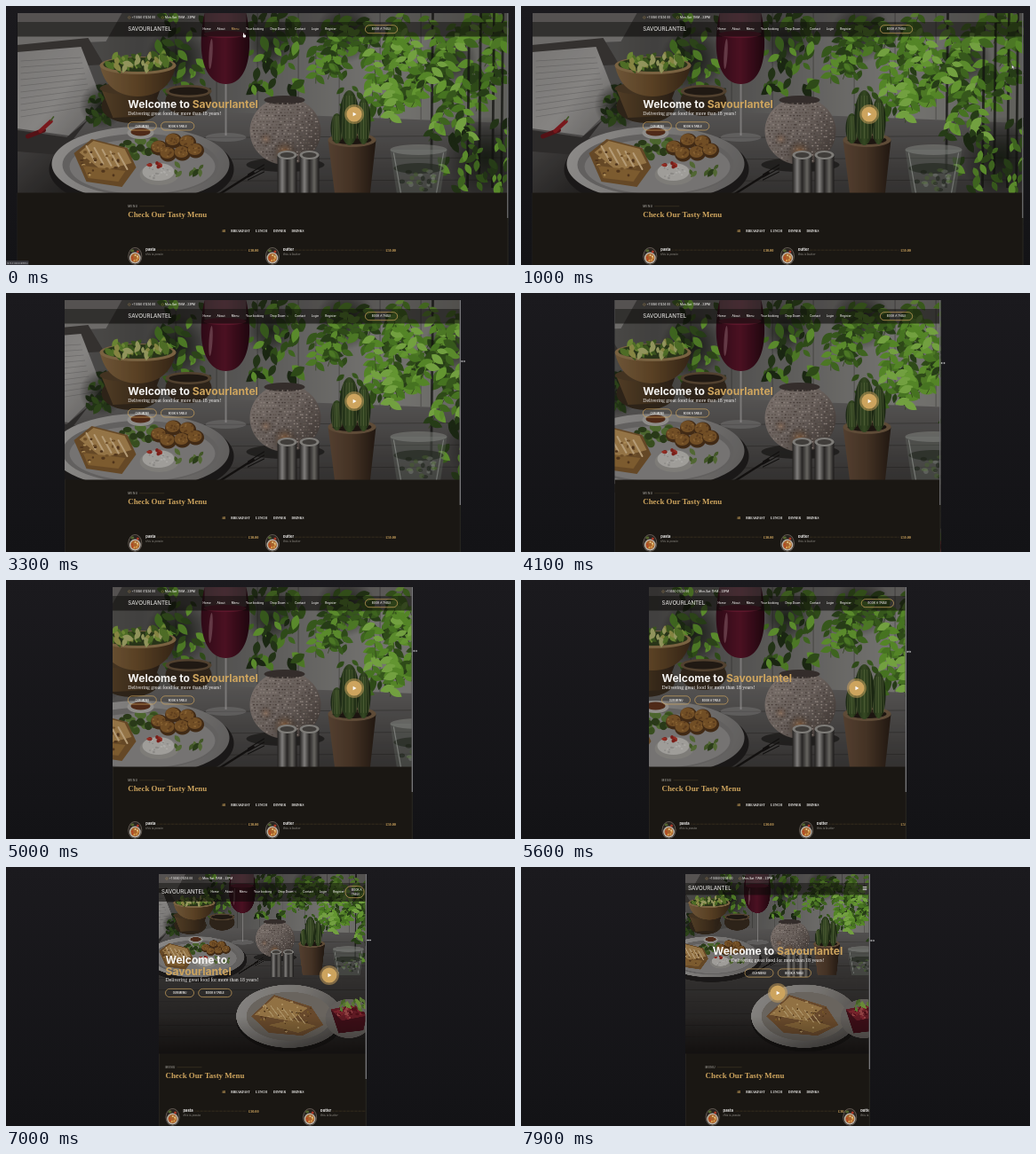
An HTML page with a canvas for the animation above (8000 ms loop, 573 px wide and 292 px high).

```html
<!DOCTYPE html>
<html lang="en">
<head>
<meta charset="utf-8">
<title>Responsive restaurant page</title>
<style>
html, body { margin: 0; width: 100%; height: 100%; overflow: hidden; background: #18171b; }
canvas { display: block; width: 573px; height: 292px; }
</style>
</head>
<body>
<canvas id="stage"></canvas>
<script>
const W = 573, H = 292, LOOP = 8000, MID = 289, TOP = 8, FOLD = 210.5;
const GOLD = '#cda45e', WHITE = '#f4f3f1';
const SANS = 'Inter, "Open Sans", sans-serif';
const SERIF = '"Liberation Serif", "Noto Serif", serif';
const BRAND = 'Savourlantel';
const PHOTO_W = 553, PHOTO_H = 369;

const dpr = Math.max(1, window.devicePixelRatio || 1);
const stage = document.getElementById('stage');
stage.width = W * dpr;
stage.height = H * dpr;
const ctx = stage.getContext('2d');

function randomizer(seed) {
  return () => {
    seed = (seed * 1664525 + 1013904223) >>> 0;
    return seed / 4294967296;
  };
}

// Linear interpolation through [time, value] stops
function track(stops, t) {
  if (t <= stops[0][0]) return stops[0][1];
  for (let i = 1; i < stops.length; i++) {
    const [t0, a] = stops[i - 1], [t1, b] = stops[i];
    if (t <= t1) return a + (b - a) * (t - t0) / (t1 - t0);
  }
  return stops[stops.length - 1][1];
}

/* ---------- photo backdrop, painted once ---------- */

function paintPhoto() {
  const cv = document.createElement('canvas');
  cv.width = PHOTO_W * 2;
  cv.height = PHOTO_H * 2;
  const g = cv.getContext('2d');
  g.scale(2, 2);
  g.translate(-12, -TOP);
  const rnd = randomizer(41);
  const between = (a, b) => a + (b - a) * rnd();
  const pick = list => list[Math.floor(rnd() * list.length)];

  const shade = (x0, y0, x1, y1, ...cols) => {
    const gr = g.createLinearGradient(x0, y0, x1, y1);
    cols.forEach((c, i) => gr.addColorStop(i / (cols.length - 1), c));
    return gr;
  };
  const ell = (x, y, rx, ry, col, rot = 0) => {
    g.fillStyle = col;
    g.beginPath();
    g.ellipse(x, y, rx, ry, rot, 0, 7);
    g.fill();
  };
  const glow = (x, y, r, col) => {
    const gr = g.createRadialGradient(x, y, 0, x, y, r);
    gr.addColorStop(0, col);
    gr.addColorStop(1, 'rgba(0,0,0,0)');
    ell(x, y, r, r, gr);
  };
  const rect = (x, y, w, h, col) => { g.fillStyle = col; g.fillRect(x, y, w, h); };
  const poly = (col, ...p) => {
    g.fillStyle = col;
    g.beginPath();
    for (let i = 0; i < p.length; i += 2) g.lineTo(p[i], p[i + 1]);
    g.closePath();
    g.fill();
  };
  const line = (col, w, x0, y0, x1, y1) => {
    g.strokeStyle = col;
    g.lineWidth = w;
    g.beginPath();
    g.moveTo(x0, y0);
    g.lineTo(x1, y1);
    g.stroke();
  };
  const leaf = (x, y, len, rot, col) => {
    g.save();
    g.translate(x, y);
    g.rotate(rot);
    g.fillStyle = col;
    g.beginPath();
    g.moveTo(-len, 0);
    g.quadraticCurveTo(-len * 0.2, -len, len, 0);
    g.quadraticCurveTo(-len * 0.2, len, -len, 0);
    g.fill();
    g.restore();
  };
  const leaves = (n, x0, x1, y0, y1, size, cols) => {
    for (let i = 0; i < n; i++) {
      leaf(between(x0, x1), between(y0, y1), between(size * 0.5, size), between(0.2, 2.6), pick(cols));
    }
  };
  // Sprigs: leaves in pairs along a drooping stem
  const sprigs = (n, x0, x1, y0, y1, size, cols) => {
    for (let i = 0; i < n; i++) {
      const x = between(x0, x1), y = between(y0, y1), lean = between(-0.6, 0.6);
      line('#34491f', 0.7, x, y, x + lean * 36, y + 36);
      for (let k = 0; k < 8; k++) {
        const side = k % 2 ? 1 : -1;
        leaf(x + lean * k * 4.5 + side * size * 0.55, y + k * 4.5, between(size * 0.6, size), side > 0 ? between(0.2, 1) : between(2.1, 2.9), pick(cols));
      }
    }
  };
  const crumbs = (n, x, y, rx, ry, r, cols) => {
    for (let i = 0; i < n; i++) {
      const a = between(0, 6.28), d = Math.sqrt(rnd());
      ell(x + Math.cos(a) * rx * d, y + Math.sin(a) * ry * d, between(r * 0.5, r), between(r * 0.4, r * 0.8), pick(cols));
    }
  };

  // wall and table
  rect(12, 8, 553, 369, shade(12, 0, 565, 0, '#62615f', '#4a4a48', '#686866', '#858582', '#6c6d68'));
  for (let x = 190; x < 480; x += 46) rect(x, 8, 1.2, 120, 'rgba(35,35,32,.35)');
  poly(shade(0, 120, 0, 377, '#605f5e', '#3b3a39', '#2c2b2a', '#1f1d1c'), 12, 135, 200, 118, 565, 132, 565, 377, 12, 377);
  for (let i = 0; i < 9; i++) line('rgba(18,17,16,.3)', 1, 12, 150 + i * 24, 565, 146 + i * 25);

  // notebook, papers and the dark corner on the left
  poly('#7c7b79', 12, 8, 130, 8, 112, 40, 12, 44);
  poly('#3a3836', 12, 44, 92, 36, 110, 66, 12, 72);
  poly(shade(12, 60, 110, 140, '#8a8987', '#989795', '#6e6d6b'), 12, 52, 84, 46, 108, 108, 70, 146, 12, 138);
  for (let i = 0; i < 10; i++) line('rgba(60,60,60,.3)', 0.7, 16, 62 + i * 7, 84 + i * 1.5, 58 + i * 6);
  poly('#333130', 12, 140, 68, 148, 92, 128, 60, 170, 12, 168);
  poly(shade(12, 150, 70, 215, '#4b4a49', '#242322'), 12, 164, 62, 168, 80, 215, 12, 215);

  // foliage
  const deep = ['#1d2c15', '#263a19', '#314d1d'];
  const greens = ['#34551c', '#467324', '#56892a', '#2a451a', '#669e32', '#3d6420'];
  const fresh = ['#5f992d', '#70ab38', '#82b849', '#4f8426'];
  for (const [x, y, r] of [[192, 60, 36], [108, 112, 26], [298, 42, 30], [382, 30, 34], [540, 170, 46], [500, 60, 30]]) {
    glow(x, y, r, 'rgba(18,26,14,.85)');
  }
  leaves(55, 170, 228, 8, 100, 9, deep.concat(greens));
  leaves(30, 92, 122, 92, 132, 8, deep);
  leaves(55, 272, 335, 8, 100, 10, deep.concat(greens));
  sprigs(9, 320, 420, 4, 62, 9, greens);
  leaves(50, 360, 440, 30, 128, 9, greens);
  sprigs(15, 415, 560, 0, 90, 10, greens);
  for (const x of [480, 521, 534, 549, 559]) line('rgba(18,19,17,.75)', 2.8, x, 8, x - 2, 205);
  sprigs(10, 410, 490, 10, 100, 9, fresh);
  sprigs(10, 485, 562, 10, 130, 10, fresh.concat(greens));
  leaves(55, 490, 565, 130, 208, 9, deep.concat(greens));

  // wooden bowls with salad
  ell(140, 113, 33, 19, '#33281b');
  poly(shade(105, 0, 175, 0, '#5d472c', '#463520', '#2a2017'), 106, 92, 174, 92, 162, 124, 120, 126);
  ell(139, 93, 34, 7, '#4c3b26');
  g.fillStyle = shade(105, 0, 190, 0, '#7d6240', '#654a29', '#3b2a19');
  g.beginPath();
  g.moveTo(105, 66);
  g.quadraticCurveTo(112, 101, 148, 102);
  g.quadraticCurveTo(184, 101, 191, 66);
  g.fill();
  ell(148, 67, 43, 10, '#8a704b');
  ell(148, 66, 39, 8, '#2d3c1c');
  leaves(48, 116, 181, 55, 72, 7, ['#587c2c', '#78983a', '#425f22', '#98984c', '#a5aa6a']);
  ell(205, 107, 26, 17, '#33281d');
  ell(205, 96, 26, 7, '#5d4b36');
  ell(205, 96, 22, 4.5, '#241d16');

  // wine glass
  line('#8b8a89', 2, 247, 86, 247, 146);
  ell(247, 148, 23, 5, 'rgba(165,165,165,.3)');
  g.fillStyle = shade(220, 0, 272, 0, '#350c1a', '#551327', '#260812');
  g.beginPath();
  g.moveTo(223, 8);
  g.bezierCurveTo(212, 60, 226, 88, 247, 88);
  g.bezierCurveTo(268, 88, 280, 60, 270, 8);
  g.fill();
  rect(223, 8, 47, 22, 'rgba(120,118,116,.45)');
  ell(246, 32, 24, 4, '#6b1a32');
  ell(230, 54, 2, 17, 'rgba(200,160,170,.35)', 0.06);

  // red chillies
  g.lineCap = 'round';
  line('#5f1519', 5, 24, 147, 42, 140);
  line('#8a1b20', 4.5, 38, 141, 50, 130);
  line('#49632d', 1.6, 50, 129, 53, 125);

  // plate with pastry, fritters and rice
  ell(152, 184, 104, 46, '#1d1c1b');
  ell(151, 178, 100, 42, shade(50, 130, 250, 220, '#a3a2a0', '#8a8987', '#696867'));
  ell(151, 179, 88, 35, '#6f6e6d');
  ell(153, 181, 82, 31, '#858483');
  crumbs(24, 150, 160, 26, 10, 6, ['#3f5a24', '#567535', '#2e421c']);
  poly('#73532c', 76, 166, 96, 150, 136, 160, 146, 182, 130, 204, 90, 198);
  poly('#a98550', 82, 165, 98, 152, 133, 161, 141, 177, 108, 186);
  for (let i = 0; i < 5; i++) line('#cdb287', 2, 90 + i * 9, 158 + i * 2, 100 + i * 9, 176 + i * 2);
  poly('#8d6836', 86, 180, 134, 186, 126, 198, 92, 194);
  crumbs(26, 110, 176, 28, 18, 2.2, ['#5b3d20', '#c29f64', '#7d5b2f']);
  for (const [x, y] of [[172, 160], [188, 152], [204, 154], [182, 167], [198, 166], [213, 163]]) {
    ell(x, y, 9.5, 8.5, '#4a3018');
    ell(x - 1, y - 1.5, 8, 6.5, '#80592b');
    crumbs(8, x - 1, y - 2, 7, 5, 1.5, ['#9b713a', '#684521']);
  }
  ell(172, 190, 22, 12, '#8f8e8a');
  ell(171, 187, 18, 10, '#b5b4b0');
  crumbs(20, 171, 187, 15, 8, 1.6, ['#c6c5c1', '#9d9c98']);
  crumbs(8, 168, 180, 8, 3, 3, ['#8a231d', '#a63428']);
  leaves(10, 190, 222, 178, 192, 6, ['#49632c', '#5c763a', '#2f451d']);
  ell(151, 143, 15, 7, '#a3a29e');
  ell(151, 142, 11, 4.5, '#59301c');

  // textured lantern
  ell(314, 179, 44, 8, 'rgba(12,11,10,.55)');
  ell(314, 141, 40, 38, shade(274, 110, 354, 175, '#8c827c', '#756c67', '#3d3632'));
  ell(313, 106, 23, 5, '#3a3431');
  g.save();
  g.beginPath();
  g.ellipse(314, 142, 39, 36, 0, 0, 7);
  g.clip();
  for (let y = 110; y < 180; y += 3.4) {
    for (let x = 276; x < 354; x += 3.4) ell(x + between(-1, 1), y, 1, 0.8, pick(['#544a45', '#9c918a', '#6b615b']));
  }
  glow(313, 164, 15, 'rgba(200,125,60,.5)');
  glow(292, 150, 10, 'rgba(190,130,85,.35)');
  g.restore();

  // cactus in a clay pot
  poly(shade(360, 0, 417, 0, '#604a38', '#4d3a2a', '#231a13'), 362, 151, 416, 151, 409, 215, 370, 215);
  ell(389, 151, 27, 8, '#6b563f');
  ell(389, 151, 22, 5, '#1f1812');
  for (const [x, y, rx, ry] of [[372, 138, 7, 17], [402, 130, 8, 26], [386, 126, 11, 31]]) {
    ell(x, y, rx, ry, shade(x - rx, 0, x + rx, 0, '#1d2c17', '#3c5328', '#182511'));
    for (let i = -2; i <= 2; i++) line('rgba(150,160,105,.4)', 0.7, x + i * rx * 0.3, y - ry * 0.8, x + i * rx * 0.38, y + ry * 0.75);
  }

  // shakers and water glass
  for (const x of [305, 330]) {
    rect(x, 168, 22, 52, shade(x, 0, x + 22, 0, '#242322', '#93928f', '#2c2b2a', '#75746f', '#1d1c1b'));
    ell(x + 11, 168, 11, 5, '#8f8e8a');
    ell(x + 11, 168, 8, 3, '#484643');
  }
  poly('rgba(105,112,105,.4)', 432, 162, 496, 162, 488, 216, 440, 216);
  ell(464, 162, 32, 6, 'rgba(165,170,163,.42)');
  ell(464, 183, 28, 6, 'rgba(40,48,38,.7)');
  crumbs(26, 464, 196, 21, 12, 4, ['rgba(160,168,158,.35)', 'rgba(30,36,26,.55)', 'rgba(80,110,50,.45)']);
  line('rgba(205,210,205,.45)', 1.2, 436, 166, 444, 211);
  line('rgba(205,210,205,.4)', 1.2, 492, 166, 484, 211);

  // cutlery and the front plates
  line('#131211', 2.5, 240, 212, 278, 188);
  for (let i = 0; i < 3; i++) line('#131211', 1.1, 272, 190 + i * 3, 290, 179 + i * 4);
  ell(345, 306, 111, 67, '#171615');
  ell(343, 300, 109, 65, shade(245, 240, 430, 365, '#989794', '#85837f', '#585653'));
  ell(343, 300, 88, 50, '#77736c');
  poly('#765432', 265, 300, 312, 256, 388, 280, 413, 318, 370, 340, 301, 334);
  poly('#a5824d', 272, 297, 313, 260, 381, 283, 344, 310);
  poly('#92703e', 300, 318, 353, 307, 398, 320, 361, 334);
  for (let i = 0; i < 6; i++) line('#c2a674', 2.2, 292 + i * 13, 276 + i * 3, 310 + i * 13, 300 + i * 3);
  crumbs(45, 335, 298, 58, 34, 2.6, ['#5e4223', '#c1a16a', '#87652f']);
  ell(465, 305, 48, 40, '#6e6b67');
  poly('#43101a', 428, 286, 476, 276, 502, 299, 495, 329, 444, 335);
  poly('#6c1e28', 428, 286, 476, 276, 502, 299, 451, 309);
  crumbs(45, 467, 293, 30, 12, 4, ['#8a2933', '#57121c', '#a34b4c']);
  leaves(20, 446, 505, 264, 286, 8, ['#50712d', '#64863b', '#78a03f']);
  rect(12, 300, 553, 77, shade(0, 300, 0, 377, 'rgba(10,9,8,0)', 'rgba(10,9,8,.45)'));
  return cv;
}

const photo = paintPhoto();

/* ---------- drawing helpers ---------- */

function box(x, y, w, h, fill) {
  ctx.fillStyle = fill;
  ctx.fillRect(x, y, w, h);
}

function disc(x, y, r, fill, ry = r) {
  ctx.fillStyle = fill;
  ctx.beginPath();
  ctx.ellipse(x, y, r, ry, 0, 0, 7);
  ctx.fill();
}

function text(str, x, y, font, fill = WHITE, align = 'left') {
  ctx.font = font;
  ctx.fillStyle = fill;
  ctx.textAlign = align;
  ctx.fillText(str, x, y);
}

function pill(x, y, w, h) {
  ctx.strokeStyle = GOLD;
  ctx.lineWidth = 0.7;
  ctx.beginPath();
  ctx.roundRect(x, y, w, h, Math.min(h / 2, 6));
  ctx.stroke();
}

function pillButton(label, x, y, w) {
  pill(x, y, w, 9.2);
  text(label, x + w / 2, y + 5.7, `600 2.9px ${SANS}`, WHITE, 'center');
}

/* ---------- page parts ---------- */

// Container width follows the page's breakpoints
function layout(half) {
  const size = half >= 163.7 ? 'xxl' : half >= 140.3 ? 'xl' : half >= 116 ? 'lg' : 'md';
  const inner = { xxl: 151.7, xl: 130.5, lg: 109.5, md: 81.4 }[size];
  return { half, size, inner, left: MID - half, right: MID + half, x: MID - inner };
}

function drawPhoto(p) {
  const k = p.half >= 119.7 ? 1 : (FOLD - TOP) / PHOTO_H;
  ctx.drawImage(photo, MID - PHOTO_W / 2 * k, TOP, PHOTO_W * k, PHOTO_H * k);
  box(p.left, TOP, p.half * 2, FOLD - TOP, 'rgba(8,7,6,.13)');
}

const NAV = [['Home', 226], ['About', 242], ['Menu', 258], ['Your booking', 280],
  ['Drop Down', 306], ['Contact', 331], ['Login', 348], ['Register', 365.5]];

function drawHeader(p, hover) {
  const small = p.size === 'md', fluid = small || p.size === 'lg';
  const wrap = p.size === 'lg' && p.half < 128;
  const barH = small ? 13.5 : wrap ? 21 : 16.5;
  box(p.left, TOP, p.half * 2, 10, 'rgba(12,11,9,.25)');
  box(p.left, 18, p.half * 2, barH, 'rgba(12,11,9,.6)');

  for (const dx of [1.5, 39]) {
    ctx.strokeStyle = 'rgba(205,164,94,.6)';
    ctx.lineWidth = 0.5;
    ctx.beginPath();
    ctx.arc(p.x + dx, 13, 1.3, 0, 7);
    ctx.stroke();
  }
  text('+1 5550 01234 00', p.x + 4.3, 14.2, `500 3.1px ${SANS}`);
  text('Mon-Sat: 11AM - 23PM', p.x + 41.7, 14.2, `500 3.1px ${SANS}`);

  const logoX = fluid ? p.left + 3 : p.x;
  text(BRAND.toUpperCase(), logoX, small ? 26.4 : wrap ? 30.4 : 28.4, `400 6.2px ${SANS}`);
  if (small) {
    for (let i = 0; i < 3; i++) box(p.right - 8.3, 22.2 + i * 1.6, 4.6, 0.7, WHITE);
    return;
  }
  // The links keep clear of the logo once the bar gets narrow
  const dx = fluid ? Math.max(0, logoX - 166) : 0, y = wrap ? 29.2 : 27.2;
  for (const [label, x] of NAV) {
    text(label, x + dx, y, `500 3.2px ${SANS}`, hover && label === 'Menu' ? GOLD : WHITE, 'center');
  }
  ctx.strokeStyle = WHITE;
  ctx.lineWidth = 0.4;
  ctx.beginPath();
  ctx.moveTo(316.2 + dx, y - 1.5);
  ctx.lineTo(317.1 + dx, y - 0.7);
  ctx.lineTo(318 + dx, y - 1.5);
  ctx.stroke();

  if (wrap) {
    const bx = Math.max(p.right - 36, 373 + dx);
    const pad = Math.min(7, p.right - bx - 16);
    pill(bx, 21.7, p.right - 3 - bx, 13);
    text('BOOK A', bx + pad, 27.2, `500 3px ${SANS}`);
    text('TABLE', bx + pad, 31.6, `500 3px ${SANS}`);
  } else {
    const bx = (fluid ? p.right - 3 : MID + p.inner) - 36.3;
    pill(bx, 21.7, 36.3, 9);
    text('BOOK A TABLE', bx + 18.15, 27.3, `500 3px ${SANS}`, WHITE, 'center');
  }
}

function drawPlay(x, y) {
  disc(x, y, 11, 'rgba(205,164,94,.5)');
  disc(x, y, 8.6, GOLD);
  ctx.fillStyle = '#fff';
  ctx.beginPath();
  ctx.moveTo(x - 1.4, y - 2.3);
  ctx.lineTo(x + 2.5, y);
  ctx.lineTo(x - 1.4, y + 2.3);
  ctx.fill();
}

function drawHero(p) {
  const title = `700 12.05px ${SANS}`, sub = `5.75px ${SERIF}`;
  const hello = 'Welcome to ', tag = 'Delivering great food for more than 18 years!';
  const small = p.size === 'md', wrap = p.size === 'lg';
  ctx.font = title;
  const helloW = ctx.measureText(hello).width;
  const x = small ? MID - (helloW + ctx.measureText(BRAND).width) / 2 : p.x;
  const y = small ? 99.3 : wrap ? 108.6 : 115.2;
  text(hello, x, y, title);
  if (wrap) text(BRAND, x, y + 13.2, title, GOLD);
  else text(BRAND, x + helloW, y, title, GOLD);

  const subY = y + (wrap ? 20.6 : 7.4);
  text(tag, small ? MID : x, subY, sub, WHITE, small ? 'center' : 'left');
  const bx = small ? 252 : x, by = subY + 8.2;
  pillButton('OUR MENU', bx, by, 32);
  pillButton('BOOK A TABLE', bx + 37.2, by, 37.3);

  if (small) drawPlay(MID, 142);
  else drawPlay(MID + (p.inner + 2.8) * 2 / 3, 122);
}

function drawDish(x, name, price, end) {
  disc(x + 8, 282, 8, '#6a6159', 10);
  disc(x + 8, 282, 7.2, '#292420', 9.2);
  disc(x + 8, 284, 6.4, '#bcb5ab', 6.5);
  disc(x + 8, 284, 5, '#a8622b', 4.9);
  for (let i = 0; i < 7; i++) {
    disc(x + 8 + Math.cos(i * 2.4) * 3.2, 284 + Math.sin(i * 2.4) * 3, 1.1, ['#d9a14e', '#b73e22', '#e1c483'][i % 3]);
  }
  disc(x + 5, 276, 2, '#53652f', 1.4);
  disc(x + 11, 277, 1.5, '#a83927');
  text(name, x + 20, 276.3, `700 4.1px ${SANS}`);
  text('this is ' + name, x + 20, 281.4, `italic 3.4px ${SANS}`, '#8b8882');
  text(price, end, 276.5, `700 4.2px ${SERIF}`, GOLD, 'right');
  ctx.strokeStyle = 'rgba(205,164,94,.5)';
  ctx.lineWidth = 0.5;
  ctx.setLineDash([0.6, 0.7]);
  ctx.beginPath();
  ctx.moveTo(x + 33, 275.2);
  ctx.lineTo(end - 13.5, 275.2);
  ctx.stroke();
  ctx.setLineDash([]);
}

const FILTERS = [['All', 245], ['BREAKFAST', 264], ['LUNCH', 287.5], ['DINNER', 308], ['DRINKS', 328.5]];

function drawMenu(p) {
  box(p.left, FOLD, p.half * 2, H - FOLD, '#1a1713');
  ctx.letterSpacing = '0.5px';
  text('MENU', p.x, 227, `500 3.1px ${SANS}`, '#a5a29b');
  ctx.letterSpacing = '0px';
  box(p.x + 13, 225.7, 28, 0.4, 'rgba(205,164,94,.35)');
  text('Check Our Tasty Menu', p.x, 237.8, `700 8.85px ${SERIF}`, GOLD);
  for (const [label, x] of FILTERS) {
    text(label, x, 255.4, `700 3.55px ${SERIF}`, label === 'All' ? GOLD : WHITE, 'center');
  }
  // The second dish keeps its old offset while the column width changes
  const span = p.size === 'md' ? 161 : p.size === 'xxl' ? 147 : p.size === 'xl' ? 126 : 105;
  drawDish(p.x, 'pasta', '£30.00', p.x + span);
  drawDish(p.x + 154.6, 'butter', '£50.00', p.x + 154.6 + span);
}

function drawPage(p, hover) {
  ctx.save();
  ctx.beginPath();
  ctx.rect(p.left, TOP, p.half * 2, H - TOP);
  ctx.clip();
  drawPhoto(p);
  drawHero(p);
  drawHeader(p, hover);
  drawMenu(p);
  box(p.right - 1.3, TOP, 1.3, H - TOP, '#25241f');
  box(p.right - 1.3, TOP, 1.3, (p.size === 'md' ? 228 : 239) - TOP, '#77777a');
  box(p.left, FOLD, 0.5, H - FOLD, '#302e2b');
  ctx.restore();
}

function drawCursor(kind, x, y) {
  ctx.save();
  ctx.translate(x, y);
  ctx.fillStyle = '#fff';
  ctx.strokeStyle = '#222';
  ctx.lineWidth = 0.4;
  ctx.beginPath();
  if (kind === 'resize') {
    ctx.fillStyle = '#c4c4c6';
    for (const s of [-1, 1]) {
      ctx.moveTo(s * 2.6, 0);
      ctx.lineTo(s * 1, -1.3);
      ctx.lineTo(s * 1, 1.3);
    }
    ctx.rect(-1.2, -0.35, 2.4, 0.7);
    ctx.fill();
  } else if (kind === 'hand') {
    ctx.roundRect(-0.9, -2.6, 1, 3.8, 0.5);
    ctx.roundRect(-1.2, -0.5, 3.2, 2.9, 0.8);
    ctx.fill();
  } else {
    for (const [px, py] of [[-1, -2.5], [-1, 2], [0, 1.2], [0.8, 2.7], [1.5, 2.3], [0.8, 0.9], [2.1, 0.8]]) ctx.lineTo(px, py);
    ctx.closePath();
    ctx.fill();
    ctx.stroke();
  }
  ctx.restore();
}

/* ---------- motion ---------- */

const HALF = [[2100, 276.5], [2900, 246], [3300, 223], [3800, 192], [4100, 183.5], [4700, 175],
  [5000, 169], [5600, 145], [6300, 124], [6500, 122], [7400, 113], [7900, 104]];
const CURSOR_X = [[0, 268], [300, 345], [600, 475], [900, 548], [1300, 570], [1700, 568]];
const CURSOR_Y = [[0, 33], [300, 44], [900, 68], [1700, 74], [2100, 74], [3300, 77], [4100, 79], [5000, 80], [6300, 82], [7900, 83]];

function draw(t) {
  const page = layout(track(HALF, t));
  const back = ctx.createLinearGradient(0, 0, 0, H);
  back.addColorStop(0, '#1b1a1e');
  back.addColorStop(1, '#131316');
  ctx.setTransform(dpr, 0, 0, dpr, 0, 0);
  box(0, 0, W, H, back);
  drawPage(page, t < 100);

  if (t < 300) {
    box(0, 287, 25.5, 5, '#35353a');
    text('127.0.0.1:8000/#menu', 0.8, 290.5, `2.3px ${SANS}`, '#d0d0d2');
  }
  const x = t < 2100 ? track(CURSOR_X, t) : page.right + 2.6;
  drawCursor(t < 100 ? 'hand' : t < 1300 ? 'arrow' : 'resize', x, track(CURSOR_Y, t));
}

const start = performance.now();
function tick() {
  const t = (performance.now() - start) % LOOP;
  draw(Math.floor(t / 100) * 100);
  requestAnimationFrame(tick);
}
tick();
</script>
</body>
</html>
```
